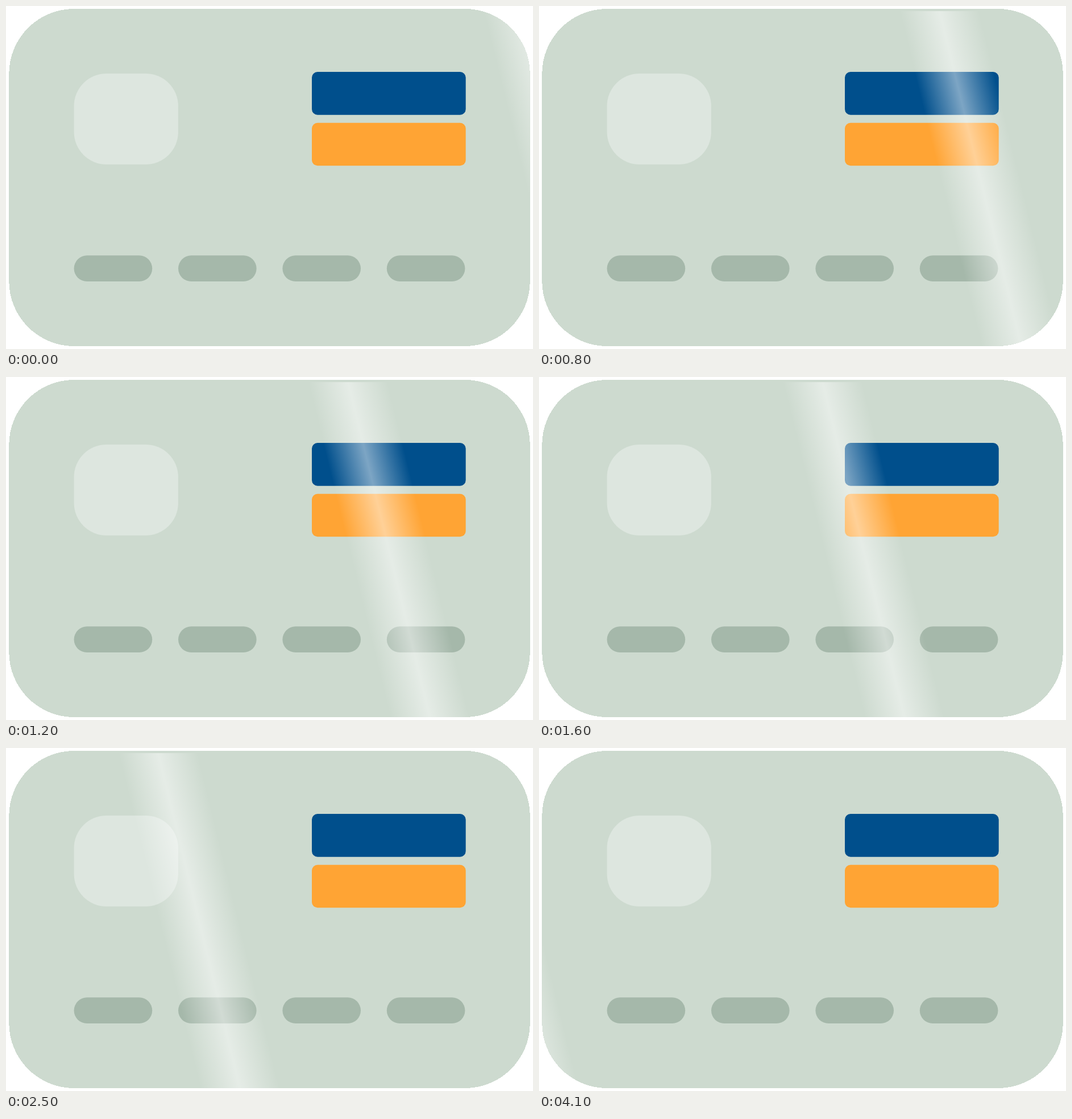
Write an HTML page that moves like this. It is 927x604 px and loops after 4200 ms.

```html
<!DOCTYPE html>
<html lang="en">
<head>
<meta charset="utf-8">
<title>Card shine</title>
<style>
  html, body { margin: 0; width: 100%; height: 100%; overflow: hidden; background: #fff; }
  svg { display: block; width: 927px; height: 604px; }
</style>
</head>
<body>
<svg viewBox="0 0 927 604">
  <defs>
    <clipPath id="edge">
      <rect x="5.3" y="5" width="916.5" height="594" rx="114.5" shape-rendering="crispEdges"/>
    </clipPath>
    <linearGradient id="glow">
      <stop offset="0" stop-color="#fff" stop-opacity="0"/>
      <stop offset=".5" stop-color="#fff" stop-opacity=".49"/>
      <stop offset="1" stop-color="#fff" stop-opacity="0"/>
    </linearGradient>
  </defs>
  <rect x="5.3" y="5" width="916.5" height="594" rx="114.5" fill="#cddacf" shape-rendering="crispEdges"/>
  <rect x="119.6" y="119" width="183.3" height="160" rx="57.3" fill="#dde6df"/>
  <rect x="538" y="116" width="270.7" height="75.7" rx="10" fill="#004f8c"/>
  <rect x="538" y="205.8" width="270.7" height="75.4" rx="10" fill="#ffa434"/>
  <g id="digits" fill="#a5b8aa"></g>
  <g clip-path="url(#edge)">
    <rect id="shine" x="-70" y="9" width="140" height="592" fill="url(#glow)"/>
  </g>
</svg>
<script>
  const LOOP = 4200, STEP = 100;
  const SLOPE = 0.244, START = 910, SPEED = 0.257;
  const shine = document.getElementById('shine');
  const digits = document.getElementById('digits');

  for (let i = 0; i < 4; i++) {
    const pill = document.createElementNS(digits.namespaceURI, 'rect');
    const attrs = { x: 119.6 + i * 183.4, y: 439.3, width: 137.6, height: 45.8, rx: 22.9 };
    for (const key in attrs) pill.setAttribute(key, attrs[key]);
    digits.append(pill);
  }

  function draw(ms) {
    const t = Math.floor((ms % LOOP) / STEP) * STEP;
    const x = START - SPEED * t - SLOPE * 9;
    shine.setAttribute('transform', `matrix(1 0 ${SLOPE} 1 ${x} 0)`);
  }

  let begin;
  function tick(now) {
    begin ??= now;
    draw(now - begin);
    requestAnimationFrame(tick);
  }
  draw(0);
  requestAnimationFrame(tick);
</script>
</body>
</html>
```
